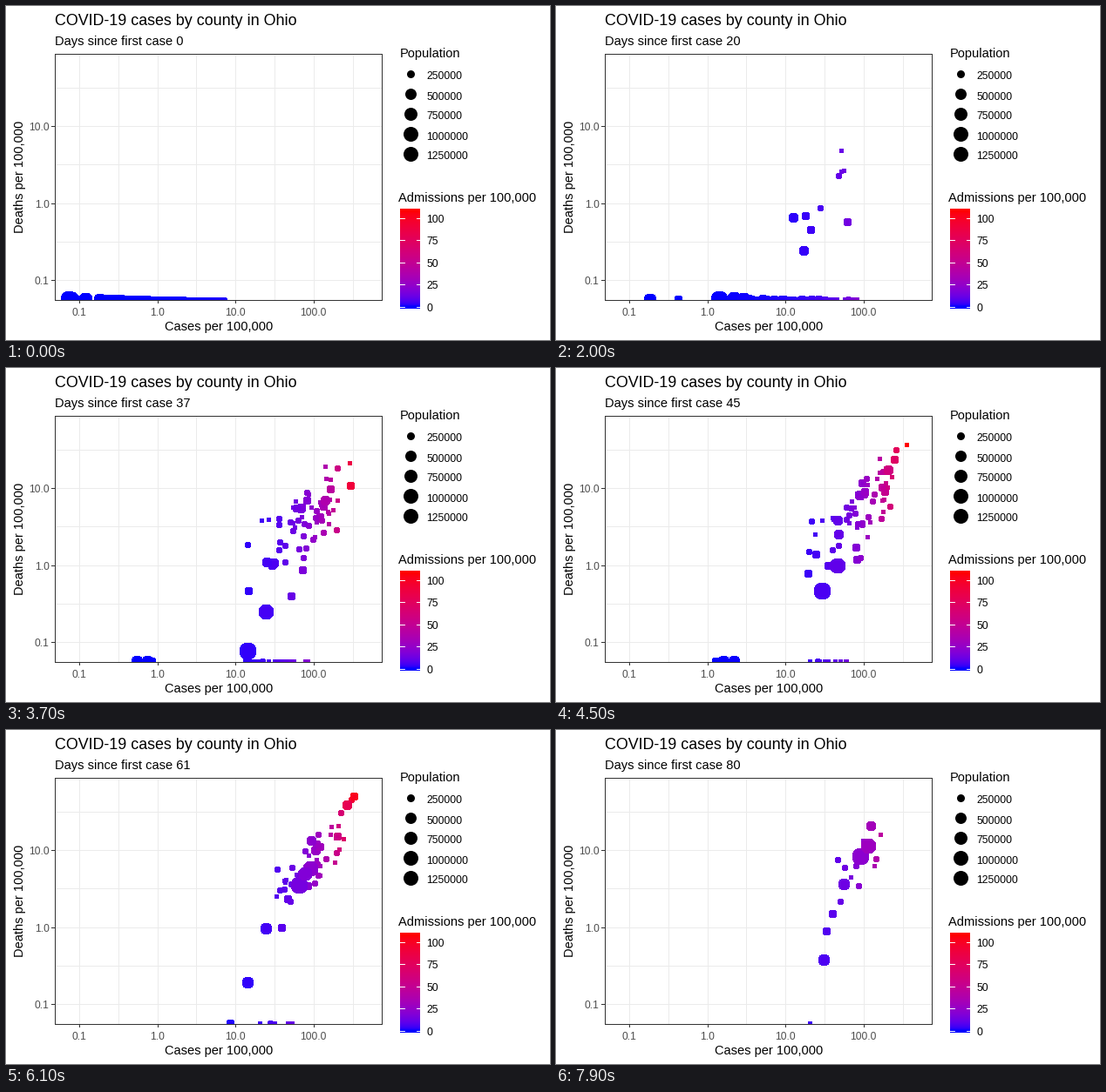
A matplotlib script for the animation above (8000 ms loop, 624 by 384 pixels).

```python
import numpy as np
import matplotlib.pyplot as plt
from matplotlib.animation import FuncAnimation
from matplotlib.patches import Rectangle

W, H, DPI = 624, 384, 96
PX = 72 / DPI
FRAMES = 80
LEFT, RIGHT, TOP, BOTTOM = 56, 431, 55, 338
GREY, DARK, GRID = "#4D4D4D", "#333333", "#EBEBEB"
plt.rcParams["font.family"] = "Liberation Sans"
rng = np.random.default_rng(19)


def x_px(rate):
    return 173.6 + 89.6 * np.log10(rate)


def y_px(rate):
    return 226.7 - 88.3 * np.log10(rate)


def radius(pop):
    """Whole-pixel dot radius for a population in thousands."""
    size = 1 + 5 * np.sqrt((pop - 13) / 1304)
    return np.floor(size * 1.4225 + 0.4725) + 0.5


def area(r):
    return (2 * r * PX) ** 2


def gradient(f):
    """Blue to red through Lab space."""
    f = np.clip(f, 0, 1)[:, None]
    lab = np.array([32.3, 79.19, -107.86]) * (1 - f) + np.array([53.24, 80.09, 67.2]) * f
    fy = (lab[:, 0] + 16) / 116
    t = np.stack([fy + lab[:, 1] / 500, fy, fy - lab[:, 2] / 200], 1)
    xyz = np.where(t > 6 / 29, t ** 3, (t - 4 / 29) * 3 * (6 / 29) ** 2)
    xyz = xyz * [0.9505, 1, 1.089]
    m = np.array([[3.2406, -1.5372, -0.4986],
                  [-0.9689, 1.8758, 0.0415],
                  [0.0557, -0.2040, 1.0570]])
    rgb = np.clip(xyz @ m.T, 0, 1)
    return np.where(rgb <= 0.0031308, 12.92 * rgb, 1.055 * rgb ** (1 / 2.4) - 0.055)


# population, growth time, final cases, final deaths per case, midpoint of deaths, last day
METROS = np.array([
    (1317, 31, 105, 0.100, 60, 90),
    (1235, 28, 125, 0.105, 58, 90),
    (817, 27, 100, 0.100, 57, 62),
    (541, 52, 32, 0.014, 60, 90),
    (532, 52, 59, 0.070, 60, 90),
    (428, 21, 290, 0.160, 45, 74),
    (371, 31, 140, 0.165, 46, 90),
    (230, 60, 43, 0.027, 70, 90),
    (229, 22, 360, 0.170, 43, 74),
])


def small_counties(n=78):
    pop = 3600 / (np.arange(n) + 10.5) - 28
    late = rng.permutation((np.arange(n) + 0.5) / n)
    last = 30 + 54 * late ** 0.45
    growth = np.minimum(16 + rng.exponential(6, n), 40)
    final_x = np.clip(380 - 50 * late + rng.normal(0, 28, n), 290, 418)
    cases = 10 ** ((final_x - 173.6) / 89.6)
    fatal = 0.07 * (cases / 100) ** 0.4 * rng.lognormal(0, 0.6, n)
    mid = rng.uniform(18, 50, n)
    return np.column_stack([pop, growth, cases, np.minimum(fatal, 0.15), mid, last])


counties = np.vstack([small_counties(), METROS])


def state(t):
    """Positions, radii and colour fractions of the dots on one day."""
    pop, growth, final, fatal, mid, last = counties[counties[:, 5] >= t].T
    first = 100 / pop
    power = np.where(growth > 45, 4, 1.5)
    rise = 1 - np.exp(-(t / growth) ** power)
    cases = np.maximum(1, np.round((final / first) ** rise))
    deaths = np.round(cases * fatal / (1 + np.exp((mid - t) / 9)))
    rate = cases * first
    y = np.where(deaths > 0, y_px(np.maximum(deaths, 1) * first), BOTTOM)
    admitted = 0.088 * rate ** 1.21
    return np.round(np.column_stack([x_px(rate), y])), radius(pop), admitted / 107


fig = plt.figure(figsize=(W / DPI, H / DPI), dpi=DPI, facecolor="white")
ax = fig.add_axes([0, 0, 1, 1])
ax.axis("off")


def line(xs, ys, color, z):
    ax.plot(xs, ys, color=color, lw=PX, zorder=z, antialiased=False, solid_capstyle="butt")


def label(x, y, s, size=9, color="black", va="baseline", **kw):
    return ax.text(x, y, s, fontsize=size, color=color, va=va, **kw)


# panel
for i in range(8):
    gx = round(83.9 + 44.85 * i)
    line([gx, gx], [TOP, BOTTOM], GRID, 1)
for i in range(6):
    gy = round(94 + 44.2 * i)
    line([LEFT, RIGHT], [gy, gy], GRID, 1)
ax.add_patch(Rectangle((LEFT, TOP), RIGHT - LEFT, BOTTOM - TOP, fill=False,
                       ec=DARK, lw=PX, zorder=4, antialiased=False))
for power in range(-1, 3):
    s = f"{10.0 ** power:.1f}"
    gx, gy = round(x_px(10.0 ** power)), round(y_px(10.0 ** power))
    line([gx, gx], [BOTTOM, BOTTOM + 3.5], DARK, 4)
    label(gx, 356, s, color=GREY, ha="center")
    if power < 2:
        line([LEFT - 3.5, LEFT], [gy, gy], DARK, 4)
        label(50, gy + 5.5, s, color=GREY, ha="right")

label(56.5, 23, "COVID-19 cases by county in Ohio", 13.4)
subtitle = label(56.5, 46, "", 11)
label(244.5, 374, "Cases per 100,000", 11, ha="center")
label(24, 197, "Deaths per 100,000", 11, ha="right", va="center", rotation=90)

# legends
label(452, 60, "Population", 11)
for i in range(5):
    pop, y = 250 * (i + 1), 78 + 23 * i
    ax.scatter([464], [y], s=area(radius(pop)), c="black", lw=0, antialiased=False)
    label(483, y + 7, f"{pop}000", 9.2)

label(451, 226, "Admissions per 100,000", 11)
shade = gradient((np.arange(115) - 2.5) / 109.4)
ax.imshow(shade[::-1, None, :], extent=(452.5, 475.5, 348.5, 233.5),
          aspect="auto", interpolation="nearest", zorder=2)
for i in range(5):
    y = round(346 - 25.55 * i)
    line([452.5, 457], [y, y], "white", 3)
    line([471, 475.5], [y, y], "white", 3)
    label(483, y + 5.5, str(25 * i), 9.2)

ax.set_xlim(0.5, W + 0.5)
ax.set_ylim(H + 0.5, 0.5)

dots = ax.scatter([], [], lw=0, zorder=3, antialiased=False)
dots.set_clip_path(Rectangle((LEFT, TOP), RIGHT - LEFT, BOTTOM - TOP, transform=ax.transData))


def update(i):
    subtitle.set_text(f"Days since first case {round(i * 1.008)}")
    xy, r, fraction = state(i)
    dots.set_offsets(xy)
    dots.set_sizes(area(r))
    dots.set_facecolor(gradient(fraction))
    return dots, subtitle


anim = FuncAnimation(fig, update, frames=FRAMES, interval=1000 / 10, repeat=True, repeat_delay=0)
plt.show()
```
